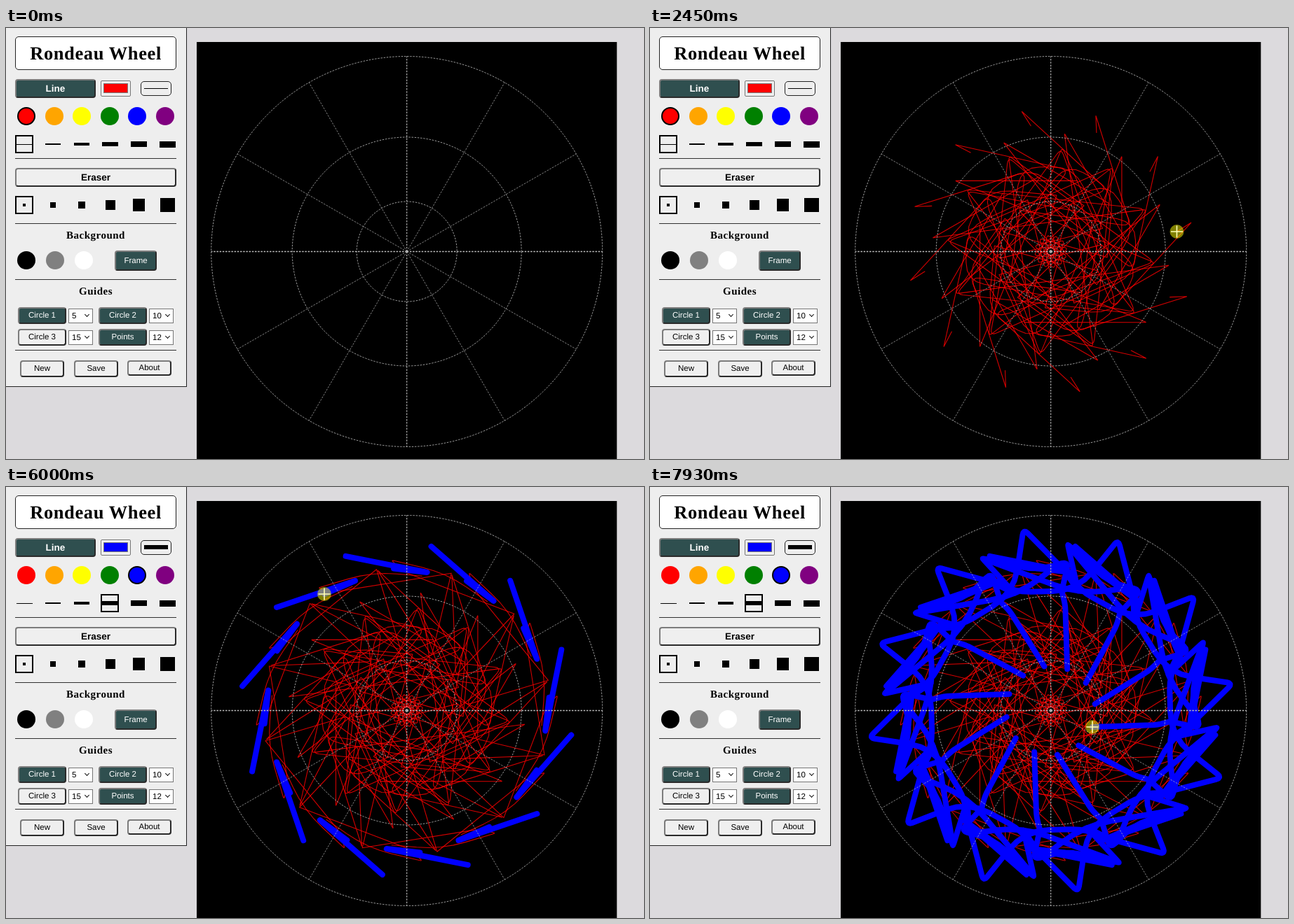
An HTML page with a canvas that plays this animation: 910 by 616 pixels, repeating every 8 s.

```html
<!DOCTYPE html>
<html lang="en">
<head>
<meta charset="utf-8">
<title>Rondeau Wheel</title>
<style>
  html, body { margin: 0; width: 100%; height: 100%; overflow: hidden; background: #dcdadd; }
  body { position: relative; font: 11.5px "Liberation Sans", Arial, sans-serif; color: #000;
    text-rendering: geometricPrecision; }
  canvas, #cursor { position: absolute; left: 0; top: 0; }
  #panel { position: absolute; left: 0; top: 0; width: 257px; height: 512px; background: #eee;
    border: solid #222; border-width: 0 1px 1px 0; }
  #panel div { position: absolute; box-sizing: border-box; display: flex;
    align-items: center; justify-content: center; white-space: nowrap; }
  #panel .title { background: #fff; border: 1px solid #222; border-radius: 5px;
    font: bold 26.5px "Liberation Serif", Times, serif; letter-spacing: .6px; }
  .head { font: bold 15px "Liberation Serif", Times, serif; letter-spacing: .5px; }
  .btn { background: #efefef; border: 2px solid; border-color: #7c7c7c #2a2a2a #2a2a2a #7c7c7c; border-radius: 4px; }
  .on { background: #2f4f4f; color: #fff; }
  .big { font-weight: bold; font-size: 13.5px; }
  .swatch { background: #efefef; border: 1px solid #767676; border-radius: 2px; }
  .chip { border: 1px solid #777; }
  .preview { border: 1px solid #222; border-radius: 5px; }
  .dot { border-radius: 50%; }
  .rule, .ink { background: #000; }
  .rule { opacity: .8; }
  .mark { border: 2px solid #000; }
  #panel .select { background: #fff; border: 1px solid #767676; justify-content: flex-start; padding-left: 4px; }
  .select::after { content: ""; position: absolute; right: 5px; top: 5px; width: 4px; height: 4px;
    border: solid #111; border-width: 0 1.5px 1.5px 0; transform: rotate(45deg); }
</style>
</head>
<body>
<canvas id="stage" width="910" height="616"></canvas>
<div id="panel"></div>
<svg id="cursor" width="910" height="616">
  <g id="hand"><path d="M-1.7 1Q0-1.3 1.5 1V6.5L7 8Q8.5 8.6 8.2 10.5L7 15V17.5H0L-4.6 10.8Q-4.6 8.3-2.8 9L-1.7 10.5Z"
    fill="#fff" stroke="#000" stroke-width="1.1"/><path d="M1.5 7V10M3.8 7.5V10M6 8.2V10.5" stroke="#000" stroke-width=".8"/></g>
  <g id="cross"><circle id="halo" r="10" fill="#ff0" fill-opacity=".5"/>
    <path id="plus" d="M-8.5 0H8.5M0-8.5V8.5" stroke-width="1.6"/></g>
</svg>
<script>
const $ = id => document.getElementById(id);
const panel = $('panel');

function box(x, y, w, h, cls, text = '', fill = '') {
  const el = document.createElement('div');
  el.className = cls;
  el.textContent = text;
  Object.assign(el.style, { left: x + 'px', top: y + 'px', width: w + 'px', height: h + 'px' });
  if (fill) el.style.background = fill;
  panel.append(el);
  return el;
}

// Control panel
const COLORS = ['red', 'orange', 'yellow', 'green', 'blue', 'purple'];
const slot = i => 26 + 40.8 * i;

box(13, 12, 230, 48, 'title', 'Rondeau Wheel');
box(13, 73, 115, 27, 'btn on big', 'Line');
box(135, 75, 43, 23, 'swatch');
const chip = box(139, 79, 35, 14, 'chip');
box(192, 76, 44, 21, 'preview');
const sample = box(197, 86, 34, 1, 'ink');
const dots = COLORS.map((c, i) => box(16 + 39.5 * i, 112.5, 26, 26, 'dot', '', c));
const weightMark = box(13, 153, 26, 26, 'mark');
box(13, 240, 26, 26, 'mark');
for (let i = 0; i < 6; i++) {
  const weight = 1 + 1.6 * i, size = 4 + 3.3 * i;
  box(slot(i) - 11, 166 - weight / 2, 22.5, weight, 'ink');
  box(slot(i) - size / 2 + .3, 253 - size / 2, size, size, 'ink');
}
box(13, 200, 230, 27, 'btn big', 'Eraser');
box(13, 288, 230, 18, 'head', 'Background');
['black', 'gray', 'white'].forEach((c, i) => box(16 + 41.2 * i, 319, 26, 26, 'dot', '', c));
box(155, 318, 60, 29, 'btn on', 'Frame');
box(13, 368, 230, 18, 'head', 'Guides');
[186, 279, 359, 460].forEach(y => box(13, y, 230, 1, 'rule'));
['Circle 1', 'Circle 2', 'Circle 3', 'Points'].forEach((name, i) => {
  const x = 17 + 115 * (i % 2), y = 399 + 31 * (i >> 1);
  box(x, y, 69, 24, name == 'Circle 3' ? 'btn' : 'btn on', name);
  box(x + 72, y + 2, 35, 21, 'select', name == 'Points' ? 12 : 5 * (i + 1));
});
box(20, 475, 63, 24, 'btn', 'New');
box(97, 475, 63, 24, 'btn', 'Save');
box(173, 475, 63, 22, 'btn', 'About');

// Pointer legs: each runs at constant speed from where the last one ended
const RED = { color: 'rgba(255,0,0,.82)', width: 1.1 };
const BLUE = { color: '#00f', width: 8 };
const legs = [];

function leg(start, end, ink, ...points) {
  const last = legs[legs.length - 1];
  if (last) points.unshift(last.line[last.line.length - 1]);
  legs.push({ start, end, ink, line: soften(points) });
}

// Rounds each corner, the less the sharper it is
function soften(points) {
  const line = [points[0]];
  for (let i = 1; i < points.length - 1; i++) {
    const [x, y] = points[i];
    const [a, b] = [points[i - 1], points[i + 1]].map(([px, py]) => {
      const d = Math.hypot(px - x, py - y);
      return { ux: (px - x) / d, uy: (py - y) / d, d };
    });
    const cut = Math.min(22 * (1 - a.ux * b.ux - a.uy * b.uy), a.d / 2, b.d / 2);
    for (let k = 0; k <= 1; k += .25) {
      const p = cut * (1 - k) ** 2, q = cut * k * k;
      line.push([x + a.ux * p + b.ux * q, y + a.uy * p + b.uy * q]);
    }
  }
  line.push(points[points.length - 1]);
  return line;
}

leg(190, 950, null, [137, 131], [430, 560], [554, 213]);
leg(955, 1812, RED, [403, 300], [709, 259], [557, 467], [475, 236], [540, 198], [619, 254]);
leg(1860, 2680, RED, [546, 325], [578, 328], [600, 250], [660, 400], [772, 278], [650, 355], [768, 383]);
leg(2720, 3070, RED, [741, 215], [747, 193], [770, 270], [764, 341]);
leg(3145, 3510, null, [217, 163]);
leg(3600, 3985, null, [177, 162]);
leg(4200, 4280, null, [157, 162]);
leg(4680, 5060, null, [205, 142], [187, 122]);
leg(5295, 5685, null, [386, 172]);
leg(5690, 5985, BLUE, [498, 134], [454, 153]);
leg(6150, 7068, BLUE, [379, 180], [525, 155], [588, 106], [611, 147], [690, 190], [777, 156], [755, 236]);
leg(7100, 7700, BLUE, [739, 268], [789, 222], [772, 300], [785, 345], [742, 335]);
leg(7840, 7918, BLUE, [724, 340], [631, 343]);

// The part of a leg travelled by time t; its last point is the pointer
function travelled({ start, end, line }, t) {
  const size = i => Math.hypot(line[i][0] - line[i - 1][0], line[i][1] - line[i - 1][1]);
  let left = 0;
  for (let i = 1; i < line.length; i++) left += size(i);
  left *= Math.min(1, (t - start) / (end - start));
  const done = [line[0]];
  for (let i = 1; i < line.length && left > 0; i++) {
    const d = size(i), f = d ? Math.min(1, left / d) : 1;
    done.push(line[i].map((v, axis) => line[i - 1][axis] + (v - line[i - 1][axis]) * f));
    left -= d;
  }
  return done;
}

// Drawing area
const g = $('stage').getContext('2d');
const CX = 571.7, CY = 319.5, POINTS = 12, RADIUS = 279;

function drawInk(ink, begun, t) {
  const path = new Path2D();
  begun.filter(l => l.ink == ink).flatMap(l => travelled(l, t)).forEach(([x, y]) => path.lineTo(x - CX, y - CY));
  g.strokeStyle = ink.color;
  g.lineWidth = ink.width;
  g.lineCap = g.lineJoin = 'round';
  for (let i = 0; i < POINTS; i++) {
    g.stroke(path);
    g.rotate(2 * Math.PI / POINTS);
  }
}

function drawGuides() {
  g.strokeStyle = '#bbb';
  g.lineCap = 'butt';
  g.setLineDash([2.5, 1.7]);
  g.lineWidth = .85;
  for (const r of [71.5, 163.5, RADIUS]) {
    g.beginPath();
    g.arc(0, 0, r, 0, 2 * Math.PI);
    g.stroke();
  }
  for (let i = 0; i < POINTS; i++) {
    const a = 2 * Math.PI * i / POINTS;
    g.lineWidth = i % 6 == 0 ? 1.5 : i % 3 == 0 ? 1.1 : .7;
    g.beginPath();
    g.moveTo(0, 0);
    g.lineTo(RADIUS * Math.cos(a), RADIUS * Math.sin(a));
    g.stroke();
  }
  g.setLineDash([]);
}

function drawPanel(t) {
  const color = t >= 5060 ? 4 : 0, weight = t >= 4510 ? 3 : 0;
  chip.style.background = COLORS[color];
  dots.forEach((d, i) => d.style.border = i == color ? '2px solid #000' : '0');
  weightMark.style.left = Math.round(slot(weight) - 13) + 'px';
  const h = weight ? 6 : 1;
  sample.style.top = 86 - (h >> 1) + 'px';
  sample.style.height = h + 'px';
}

function drawCursor(begun, t) {
  const now = begun[begun.length - 1];
  $('cursor').style.display = now ? '' : 'none';
  if (!now) return;
  const next = legs[begun.length] || now;
  const pressed = now.ink && (t < now.end || next.ink == now.ink);
  const [x, y] = travelled(now, t).pop(), inPanel = x < 258;
  $('hand').style.display = inPanel ? '' : 'none';
  $('cross').style.display = inPanel ? 'none' : '';
  $('halo').style.display = pressed ? '' : 'none';
  $('plus').setAttribute('stroke', pressed ? '#ffffb4' : '#d4ffff');
  $(inPanel ? 'hand' : 'cross').setAttribute('transform', `translate(${x} ${y})`);
}

// The picture is refreshed at a fixed beat after a short rest
const REST = 190, BEAT = 77.3;
const snap = t => t < REST ? 0 : REST + BEAT * Math.floor((t - REST) / BEAT);

function render(now) {
  const t = snap(now % 8000);
  const begun = legs.filter(l => l.start <= t);
  g.clearRect(0, 0, 910, 616);
  g.fillStyle = '#000';
  g.fillRect(272, 20, 599.3, 596);
  g.save();
  g.translate(CX, CY);
  [RED, BLUE].forEach(ink => drawInk(ink, begun, t));
  drawGuides();
  g.restore();
  drawPanel(t);
  drawCursor(begun, t);
}

const start = performance.now();
(function frame() {
  render(performance.now() - start);
  requestAnimationFrame(frame);
})();
</script>
</body>
</html>
```
